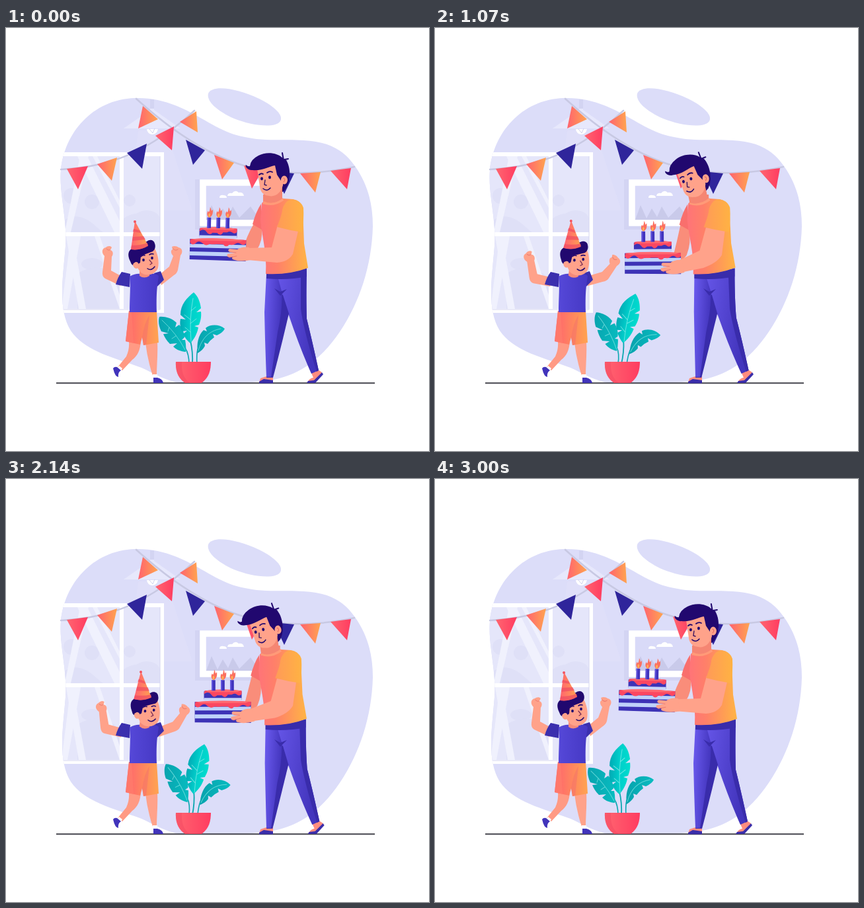
Animation of 640x640 px, one loop 3.07 s. Source, as an HTML page:

```html
<!DOCTYPE html>
<html lang="en">
<head>
<meta charset="utf-8">
<title>Birthday</title>
<style>
html, body { margin: 0; width: 100%; height: 100%; overflow: hidden; background: #fff; }
svg { display: block; width: 100vw; height: 100vh; }
.ln { fill: none; stroke-linecap: round; stroke-linejoin: round; }
</style>
</head>
<body>
<svg viewBox="0 0 640 640">
<defs>
  <linearGradient id="warm"><stop stop-color="#ff636f"/><stop offset="1" stop-color="#ffa450"/></linearGradient>
  <linearGradient id="red"><stop stop-color="#ff6570"/><stop offset="1" stop-color="#ff3c60"/></linearGradient>
  <linearGradient id="shirt"><stop stop-color="#ff7478"/><stop offset=".35" stop-color="#ff8069"/><stop offset="1" stop-color="#ffb445"/></linearGradient>
  <linearGradient id="sleeve"><stop stop-color="#ff9a58"/><stop offset="1" stop-color="#ffb243"/></linearGradient>
  <linearGradient id="blue" x2="1" y2=".3"><stop stop-color="#6c5cf0"/><stop offset="1" stop-color="#4335bd"/></linearGradient>
  <linearGradient id="top"><stop stop-color="#5548d8"/><stop offset="1" stop-color="#4638c4"/></linearGradient>
  <linearGradient id="teal"><stop stop-color="#00a9b4"/><stop offset=".5" stop-color="#00cfcb"/><stop offset="1" stop-color="#00dccd"/></linearGradient>
  <linearGradient id="deep"><stop stop-color="#08a3ae"/><stop offset="1" stop-color="#07bcc0"/></linearGradient>
  <path id="blob" d="M83 215C88 160 130 108 195 106C262 104 300 146 345 161C390 174 415 167 450 170C490 172 511 185 528 209C547 236 555 265 555 300C553 376 524 440 488 482C465 508 440 525 405 532C385 536 360 537 340 537H262C240 533 225 523 205 514C165 499 120 490 98 458C78 425 86 380 90 330C93 290 80 250 83 215Z"/>
  <clipPath id="room"><use href="#blob"/></clipPath>
</defs>

<use href="#blob" fill="#dcddf9"/>
<path d="M306 99C312 85 350 91 383 107C407 119 420 132 415 141C408 152 372 148 345 137C320 126 303 111 306 99Z" fill="#dcddf9"/>

<g clip-path="url(#room)">
  <path d="M200 155H242L282 276H186Z" fill="#e1e2fb" opacity=".6"/>
  <path d="M70 191H236V428H70Z" fill="#e5e6fa"/>
  <g fill="#dfe0f7">
    <circle cx="99" cy="254" r="12"/><circle cx="130" cy="263" r="11"/><circle cx="187" cy="261" r="9"/>
    <ellipse cx="213" cy="290" rx="20" ry="14"/><ellipse cx="130" cy="357" rx="16" ry="9"/>
    <path d="M86 292Q110 275 137 301T172 296V309H86ZM178 288Q205 270 233 294V309H178ZM108 372Q140 350 172 378V425H108Z"/>
  </g>
  <path d="M108 194H123L172 292V309H164ZM131 194H138L172 261V272ZM98 315H113L93 425H84ZM91 315H101L121 425H110ZM134 315H142L172 404V425ZM125 194L98 309H89L112 194Z" fill="#f0f1fd"/>
  <path d="M70 191H236V428H70M175 191V428M70 312H236" fill="none" stroke="#fff" stroke-width="6"/>
  <path d="M70 426H233V194" fill="none" stroke="#d3d4f0"/>
</g>
<path d="M218 108H224V124L264 152H178L218 124Z" fill="#e7e8fc"/>
<path d="M218 108H224V122H218Z" fill="#d3d4f2"/>
<path d="M213 153H230Q228 161 221 161Q214 160 213 153Z" fill="#fff"/>
<path d="M217 153L222 159L225 152" class="ln" stroke="#cfd2ed"/>

<path d="M286 229H293V304H286Z" fill="#d3d4f3"/>
<path d="M286 298H390V305H286Z" fill="#d3d4f3"/>
<path d="M298 234H398V295H298Z" fill="#d9daf8" stroke="#fff" stroke-width="9.5"/>
<path d="M303 290L311 268L320 288L328 273L336 286L343 270L353 287L370 270L384 290Z" fill="#c9caea"/>
<path d="M335 254Q336 249 342 250Q347 244 352 249Q359 248 360 254ZM323 257Q323 252 329 253Q334 253 334 257Z" fill="#fff"/>

<g class="ln" stroke="#c8c9e3" stroke-width="2.6">
  <path d="M197 107C250 155 300 188 350 205S465 224 527 210"/>
  <path d="M285 125C250 158 200 190 160 201C135 209 105 213 83 214"/>
</g>
<g id="flags"></g>

<path d="M76 537.3H558" stroke="#45454d" stroke-width="2"/>

<g id="leafL">
  <path d="M271 484Q277 493 277 509" class="ln" stroke="#0aa7b0" stroke-width="1.6"/>
  <path d="M232 437C242 436 252 440 258 446L256 453L262 449C268 456 270 463 270 468L266 472L271 472Q273 481 272 490C264 489 258 487 253 482L259 477L248 478C243 473 240 468 238 463L246 462L235 459C231 451 230 443 232 437Z" fill="url(#deep)"/>
  <path d="M236 442Q258 462 271 487M247 453L245 459M257 466L251 470" class="ln" stroke="#7fe3e2" opacity=".75"/>
</g>
<g id="leafR">
  <path d="M290 486Q288 495 289 509" class="ln" stroke="#0aa7b0" stroke-width="1.6"/>
  <path d="M331 455C323 448 309 448 302 454L304 459L299 457C291 464 288 478 290 492C295 489 299 485 301 481L300 476L305 478Q309 472 315 468L313 463L319 465Q328 461 331 455Z" fill="url(#deep)"/>
  <path d="M325 455C307 458 296 470 291 488" class="ln" stroke="#7fe3e2" opacity=".75"/>
</g>
<g id="leafM">
  <path d="M279 473Q283 490 282 509" class="ln" stroke="#0aa7b0" stroke-width="1.8"/>
  <path d="M284 400C291 406 294 416 295 424L288 430L295 429C296 438 294 444 292 449L285 451L291 453C289 464 284 471 279 477C273 472 270 467 268 463L274 458L266 459C263 451 263 445 264 440L272 441L264 434C264 418 274 408 284 400Z" fill="url(#teal)"/>
  <path d="M283 409Q277 440 280 474M280 428L287 422M279 441L270 434M279 447L288 440M279 460L271 453" class="ln" stroke="#8cecea" opacity=".75"/>
</g>
<path d="M257 505H310C310 523 304 531 296 537H271C262 531 256 521 257 505Z" fill="url(#red)"/>
<path d="M257 505H266C265 521 269 531 278 537H271C262 531 256 521 257 505Z" fill="#f34862" opacity=".5"/>

<g id="boy">
  <path d="M186 474H204C203 488 199 496 191 502L176 518L169 513L182 497Q187 486 186 474Z" fill="#ff9a84"/>
  <path d="M211 476H229C230 492 228 510 228 526H222Q214 502 211 476Z" fill="#ffa28a"/>
  <path d="M171 511L176 515L174 518L169 514ZM222 524H229L229 530H222Z" fill="#fff"/>
  <path d="M168 513L174 518Q169 521 170 528Q165 528 162 515Q164 512 168 513Z" fill="#4134bb"/>
  <path d="M223 529H229Q237 531 238 537H223Z" fill="#4134bb"/>
  <path d="M186 428H228L231 476L208 480L206 468L203 479L181 474Z" fill="url(#warm)"/>
  <path d="M186 428H190L193 477L181 474Z" fill="#ff7c6c" opacity=".8"/>
  <path d="M217 434Q209 447 206 468L208 480L212 479Z" fill="#f4726a" opacity=".55"/>
  <g id="armL">
    <path d="M181 379L159 367L160 346C163 342 162 337 158 336L160 332C158 329 153 330 151 332C145 333 144 340 149 345L146 369Q145 376 150 379L173 390Z" fill="#ffa28a"/>
    <path d="M152 334Q154 337 157 336" class="ln" stroke="#ec7a70"/>
  </g>
  <g id="armR">
    <path d="M230 375L247 361L253 345C249 341 249 336 252 335L251 331C254 329 259 330 261 332C267 333 268 339 264 344L260 366Q259 371 254 374L235 389Z" fill="#ffa28a"/>
    <path d="M253 334Q256 338 260 335" class="ln" stroke="#ec7a70"/>
  </g>
  <path d="M188 372L175 369Q169 377 166 388L187 392Z" fill="#3b2fae"/>
  <path d="M224 371L234 368L239 381L229 391Z" fill="#3b2fae"/>
  <path d="M187 376Q196 371 204 372H216Q225 370 231 375C230 385 227 393 228 430H187C187 408 189 390 187 376Z" fill="url(#top)"/>
  <g id="boyHead">
    <path d="M202 362H217V375Q209 380 202 375Z" fill="#f58a79"/>
    <path d="M191 350L193 343L224 332C230 341 232 354 230 363C226 374 211 377 203 369L199 363C192 365 189 354 195 353Z" fill="#ffa28a"/>
    <path d="M188 353C183 343 185 336 192 333L213 323C218 319 224 321 225 326C227 331 225 336 222 338Q211 342 204 345L203 355L199 358Q193 352 192 359Q189 357 188 353Z" fill="#21086f"/>
    <ellipse cx="197" cy="359" rx="4" ry="5" fill="#ffa28a"/>
    <path d="M195 292L215 329Q204 337 189 335Z" fill="url(#warm)"/>
    <path d="M193 304L202 306L204 310L192 308ZM192 316L208 315L211 320L191 322ZM190 329Q204 329 214 325L215 330Q203 337 189 335Z" fill="#ef4e63" opacity=".75"/>
    <circle cx="195" cy="293" r="2" fill="#f4535f"/>
    <path d="M204 346Q207 343 210 344M217 343Q220 341 223 342" class="ln" stroke="#21086f" stroke-width="1.6"/>
    <ellipse cx="208" cy="351" rx="1.9" ry="2.2" fill="#21086f"/><ellipse cx="221" cy="348" rx="1.9" ry="2.2" fill="#21086f"/>
    <path d="M217 351L221 356L218 358" class="ln" stroke="#7c2f55" stroke-width="1.3"/>
    <path d="M214 364Q220 368 225 361" class="ln" stroke="#21086f" stroke-width="1.5"/>
  </g>
</g>

<g id="man">
  <path d="M385 530L394 527H404V536H383Z" fill="#ff8d7f"/>
  <path d="M383 535L390 531L404 533V537.5H383Z" fill="#3a2eaa"/>
  <g id="foot">
    <path d="M462 522L472 517L478 521Q475 527 468 533L456 536Q459 530 465 529Z" fill="#ff8d7f"/>
    <path d="M478 521L480 524L468 537H455L457 534L466 533Z" fill="#3a2eaa"/>
  </g>
  <path id="legBack" fill="url(#blue)"/>
  <path id="legEdge" fill="#392cab"/>
  <path id="legShade" fill="#392cab"/>
  <path id="legFront" fill="url(#blue)"/>
  <path id="belt" fill="#392cab"/>
  <path id="armFar" fill="#f98d7a"/>
  <g id="torso">
    <path d="M389 252H418V264Q403 272 389 266Z" fill="#f58673"/>
    <path d="M386 266Q378 278 373 297L387 305Z" fill="#f96f6d"/>
    <path d="M387 265L390 262Q404 269 419 258L434 259Q446 261 449 272L451 326L457 363Q427 374 393 372C395 340 387 315 385 290Z" fill="url(#shirt)"/>
    <path d="M390 262Q404 269 419 257L420 261Q405 272 388 266Z" fill="#ff9a78"/>
  </g>
  <g id="head">
    <path d="M411 207L428 217Q431 232 422 245L417 249Z" fill="#21086f"/>
    <path d="M390 240H418V258Q403 269 390 261Z" fill="#f58673"/>
    <path d="M380 213L411 205L419 224V238C416 250 407 256 398 254C390 253 385 249 384 240Z" fill="#ffa28a"/>
    <path d="M363 207C361 209 366 216 373 215C386 217 399 209 407 208L410 222L416 231L424 224L429 225C430 213 427 205 424 200L427 201L420 198L417 189L419 197C410 188 393 187 382 193Q370 199 369 209Q366 210 363 207Z" fill="#21086f"/>
    <path d="M420 200L418 189M421 199L427 198" class="ln" stroke="#21086f" stroke-width="2"/>
    <ellipse cx="421" cy="230" rx="5" ry="6.5" fill="#ffa28a"/>
    <path d="M420 227Q424 229 420 233" class="ln" stroke="#e2685f"/>
    <path d="M383 222Q386 219 389 221M395 219Q399 216 403 218" class="ln" stroke="#21086f" stroke-width="1.8"/>
    <ellipse cx="387" cy="228" rx="2" ry="2.4" fill="#21086f"/><ellipse cx="399" cy="226" rx="2" ry="2.4" fill="#21086f"/>
    <path d="M392 230L391 237L394 238" class="ln" stroke="#3a1660" stroke-width="1.4"/>
    <path d="M389 243Q395 248 400 242" class="ln" stroke="#21086f" stroke-width="1.6"/>
  </g>
</g>

<g id="cake">
  <path d="M278 320H363V352L278 351Z" fill="#3d33b6"/>
  <path d="M278 327.5H363V333H278ZM278 339H363V345H278Z" fill="#bfd2fa"/>
  <path d="M279 320Q320 317 363 320L363 325Q359 329 355 326T347 326T338 327Q333 333 328 327H318Q313 328 308 327Q302 331 297 326T287 326T278 325Z" fill="#fb4761"/>
  <path d="M281 320Q320 316 360 320L355 322H286Z" fill="#ff6870"/>
  <path d="M292 304H349V317L292 316Z" fill="#3d33b6"/>
  <path d="M292 314H349V318H292Z" fill="#c8d6fb"/>
  <path d="M293 303Q320 300 349 303V308Q346 312 342 309T334 309H328Q324 316 319 310H312Q307 315 303 309T292 308Z" fill="#fb4761"/>
  <path d="M295 303Q320 299 347 303L343 305H298Z" fill="#ff6870"/>
  <g id="candles"></g>
</g>

<g id="near">
  <path id="armNear" fill="#ffa28a"/>
  <g id="hand">
    <path d="M368 332Q357 330 350 335L338 334Q334 337 339 339L347 340L335 342Q333 346 338 347L343 346Q340 350 346 351Q355 354 370 351Z" fill="#ffa28a"/>
    <path d="M339 339L348 340M338 347L349 345" class="ln" stroke="#ec7a70"/>
  </g>
  <path id="sleeveNear" d="M431 259Q446 260 450 272Q451 290 448 309Q428 306 410 301Q418 281 418 275Q421 263 431 259Z" fill="url(#sleeve)"/>
</g>
</svg>

<script>
const LOOP = 3070, STEPS = 43;
const $ = id => document.getElementById(id);

// colour, then three corners of each pennant
const flags = [
  ["url(#red)", "92,213 124,209 109,244"], ["url(#warm)", "138,206 168,196 160,231"],
  ["#2f259b", "183,189 213,175 206,213"], ["url(#red)", "226,163 254,149 251,185"],
  ["url(#warm)", "207,118 230,138 200,152"], ["url(#warm)", "263,142 288,126 290,158"],
  ["#2f259b", "272,169 301,185 283,207"], ["url(#warm)", "315,192 345,204 327,229"],
  ["url(#red)", "360,208 388,215 372,243"], ["#2f259b", "405,217 436,220 421,251"],
  ["url(#warm)", "445,220 476,218 468,249"], ["url(#red)", "491,216 522,212 516,244"]
];
$("flags").innerHTML = flags.map(([c, p]) => `<polygon points="${p}" fill="${c}"/>`).join("");

$("candles").innerHTML = [306.5, 320.5, 334.5].map(x => `<g transform="translate(${x} 286)">
  <path d="M-2.8 1H2.8V17H-2.8Z" fill="#4034bd"/><path d="M-2.8 1H-1V17H-2.8Z" fill="#6255df"/>
  <path d="M0 1C-4 -1 -4 -6 -2 -9L-1 -7Q1 -9 1 -15Q3 -12 3 -9L5 -11C6 -5 4 0 0 1Z" fill="#fb705f"/>
  <path d="M0 1Q-3 -2 0 -6Q3 -3 0 1Z" fill="#ffb254"/></g>`).join("");

// paths at the two ends of the swing
const morphs = {
  legBack: ["M398 372L455 364Q454 410 455 440Q462 468 473 518L462 523Q445 485 428 435L408 396Z",
            "M396 372L453 364Q453 410 456 438Q464 468 475 518L464 523Q446 485 428 435L408 396Z"],
  legEdge: ["M446 368L455 364Q454 410 455 440Q462 468 473 518L470 520Q451 460 446 425Z",
            "M443 368L453 364Q453 410 456 438Q464 468 475 518L471 520Q452 460 446 425Z"],
  legShade: ["M407 396L419 404L428 432Q417 480 404 529H394Z",
             "M407 396L419 404L427 432Q415 480 403 529H394Z"],
  legFront: ["M394 372L411 376L417 398Q419 425 411 460L401 528L394 528Q392 480 391 430Z",
             "M392 372L410 376L417 398Q418 425 410 460L401 528L394 528Q393 480 392 430Z"],
  belt: ["M394 371Q427 374 455 363V376Q427 382 394 379ZM406 394L415 399L425 395L415 405Z",
         "M392 371Q424 374 453 363V376Q424 382 392 379ZM406 394L415 399L425 395L415 405Z"],
  armFar: ["M375 296L387 304Q389 321 379 337L365 348L358 336Q364 315 375 296Z",
           "M371 296L384 304Q388 326 381 346L370 360L360 352Q367 324 371 296Z"],
  armNear: ["M411 298L402 332L365 333L366 351L410 355Q427 354 434 342L443 303Z",
            "M411 298L400 338L369 357L373 375L405 365Q427 356 434 344L438 303Z"]
};

const mix = (a, b, p) => {
  const ends = b.match(/[\d.]+/g);
  let i = 0;
  return a.replace(/[\d.]+/g, n => (+n + (ends[i++] - n) * p).toFixed(2));
};

// id: dx, dy, turn, pivot x, pivot y at the far end of the swing
const moves = {
  leafL: [0, 0, 11.5, 281, 508], leafM: [0, 0, 13, 283, 508], leafR: [2, 0, 13.5, 283, 506],
  armL: [-2, 0, -19, 178, 380], armR: [0, 1, 29, 232, 379], boyHead: [0, 0, 9.7, 208, 373],
  torso: [-3, 0, -1, 425, 365], head: [-7, 0.5, -14.2, 405, 258], foot: [2.5, 0, 0, 468, 530],
  cake: [11.5, 26, -2, 320, 335], hand: [8.5, 25.5, -6, 352, 342], sleeveNear: [-4.5, 0, -1, 430, 285]
};
const tilt = { cake: 1.2 };

function draw(now) {
  const step = Math.floor((now % LOOP) / LOOP * STEPS + 0.02);
  const p = (1 - Math.cos(2 * Math.PI * step / STEPS)) / 2;
  for (const id in morphs) $(id).setAttribute("d", mix(...morphs[id], p));
  for (const id in moves) {
    const [dx, dy, turn, x, y] = moves[id];
    $(id).setAttribute("transform",
      `translate(${dx * p} ${dy * p}) rotate(${turn * p + (tilt[id] || 0)} ${x} ${y})`);
  }
}

const start = performance.now();
function tick() {
  draw(performance.now() - start);
  requestAnimationFrame(tick);
}
tick();
</script>
</body>
</html>
```
